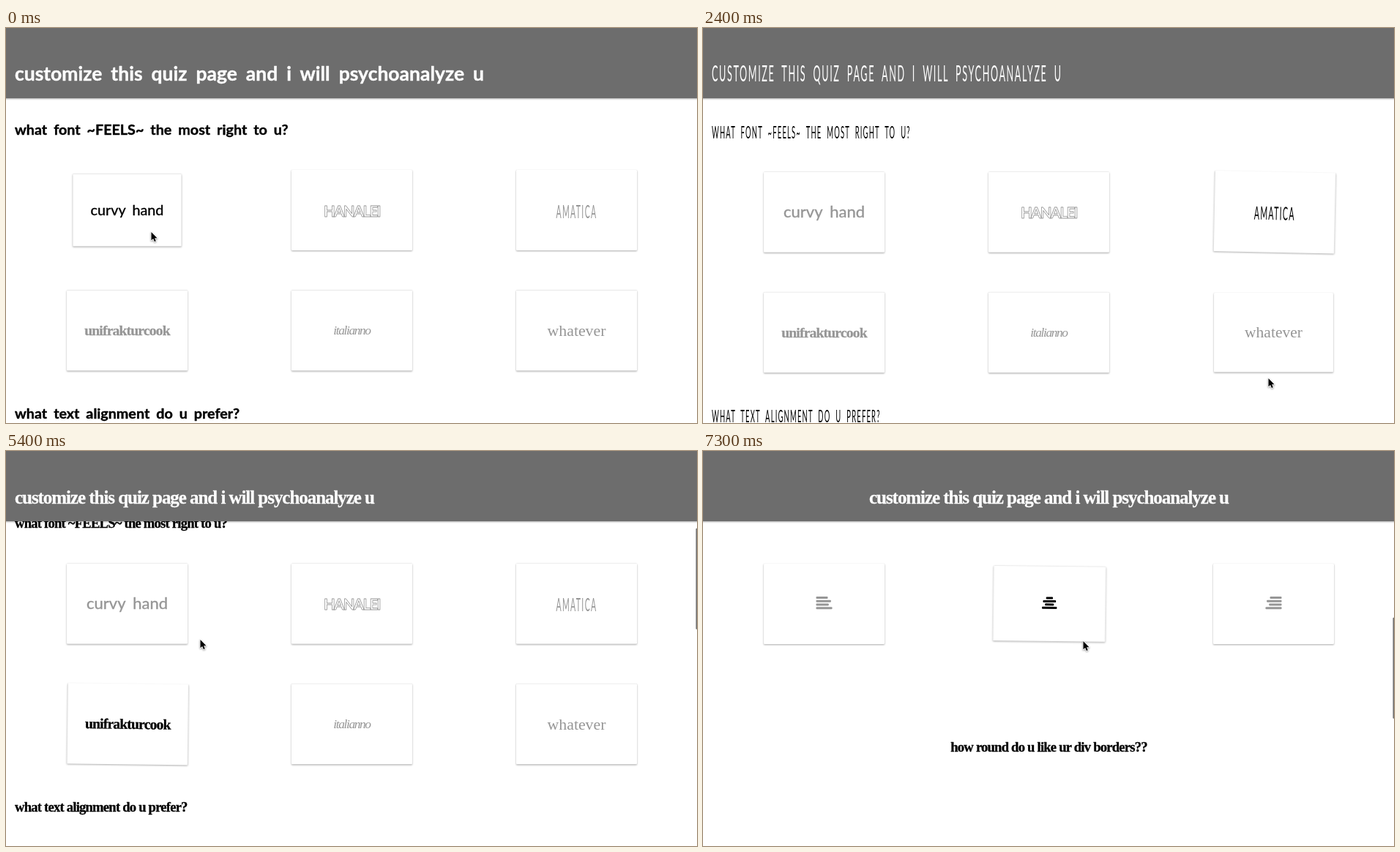
An HTML page that plays this animation: 944 by 540 pixels, repeating every 7400 ms.

```html
<!DOCTYPE html>
<html lang="en">
<head>
<meta charset="utf-8">
<title>quiz page</title>
<style>
  html, body { margin: 0; width: 100%; height: 100%; overflow: hidden; background: #fff; }
  svg { display: block; }
  text { white-space: pre; }
  .card { fill: #fff; filter: drop-shadow(0 0 .6px #0003) drop-shadow(0 1px 1px #0005); }
  .bar { fill: #6d6d6d; filter: drop-shadow(0 1px 1px #0005); }
  .cursor { stroke: #fff; stroke-width: 1.6; paint-order: stroke; stroke-linejoin: round; filter: drop-shadow(0 1px 1px #0006); }
</style>
</head>
<body>
<svg id="stage" width="944" height="540" viewBox="0 0 944 540"></svg>
<script>
const LOOP = 7400, STEP = 100, GREY = '#969696';
const MID = 472.5, COLUMN = 307, SCROLL = 441;
const SERIF = 'Liberation Serif, serif', SANS = 'Lato, sans-serif';

// size: title size, label: size on the card; spacings are in em
const faces = [
  { name: 'curvy hand', font: SANS, size: 26.5, label: 22, word: .21, stroke: .4 },
  { name: 'hanalei', font: SANS, size: 25, label: 20.5, space: -.08, caps: true, outline: true, bold: true },
  { name: 'amatica', font: SANS, size: 30, label: 25, space: .13, word: .35, caps: true, slim: .42, light: true },
  { name: 'unifrakturcook', font: SERIF, size: 25, label: 19.6, space: -.042, bold: true, stroke: .3 },
  { name: 'italianno', font: SERIF, size: 20, label: 17.4, space: -.08, italic: true },
  { name: 'whatever', font: SERIF, size: 25, label: 21.8 }
];

// Cursor stops: time, x, y and the card clicked there (0-5 faces, 6-8 alignments)
const stops = [
  [-2000, 199, 279, 0], [0, 199, 279], [600, 488, 412, 4], [1200, 533, 393],
  [1500, 505, 262, 1], [2020, 785, 262, 2], [2280, 773, 479], [2400, 773, 479],
  [2700, 790, 425, 5], [3250, 795, 420], [3650, 480, 132], [4100, 196, 234, 0],
  [4720, 182, 400, 3], [5400, 266, 258], [6600, 371, 231], [6880, 480, 215, 7], [7300, 520, 260]
];
const clicks = stops.filter(s => s.length > 3).map(s => ({ time: s[0], card: s[3] }));

const clamp = v => Math.max(0, Math.min(1, v));
const smooth = v => (v = clamp(v), v * v * (3 - 2 * v));
const scrollAt = t => SCROLL * smooth((t - 4900) / 1200) ** 2.48;

function cursorAt(t) {
  const n = Math.max(1, stops.findIndex(s => s[0] >= t));
  const [t0, x0, y0] = stops[n - 1], [t1, x1, y1] = stops[n];
  const k = smooth((t - t0) / (t1 - t0));
  return [x0 + (x1 - x0) * k, y0 + (y1 - y0) * k];
}

function stateAt(t) {
  const done = clicks.filter(c => c.time <= t);
  const face = faces[done.findLast(c => c.card < 6).card];
  return {
    last: done.at(-1), face,
    align: done.findLast(c => c.card > 5)?.card,
    row: 228.5 + .775 * face.size - scrollAt(t) // centre of the first card row
  };
}

const cardX = i => MID + (i % 3 - 1) * COLUMN;
const cardY = (i, row) => row + [0, 164.5, 402][Math.floor(i / 3)];

// Share of the last 200 ms the cursor spent on the card
function hover(i, t) {
  let sum = 0;
  for (let k = 0; k < 8; k++) {
    const then = t - k * 25, [x, y] = cursorAt(then);
    sum += Math.abs(x - cardX(i)) < 75 && Math.abs(y - cardY(i, stateAt(then).row)) < 51;
  }
  return sum / 8;
}

function write(str, face, size, x, y, color, anchor, bold) {
  const { slim = 1, space = 0, word = 0, stroke = 0 } = face;
  const paint = face.outline
    ? `fill="none" stroke="${color}" stroke-width=".8"`
    : `fill="${color}" stroke="${color}" stroke-width="${stroke}"`;
  return `<text transform="translate(${x} ${y}) scale(${slim} 1)" ${paint} stroke-linejoin="round"
    font-family="${face.font}" font-size="${size}" font-weight="${bold ? 700 : 400}"
    font-style="${face.italic ? 'italic' : 'normal'}" letter-spacing="${space * size}"
    word-spacing="${word * size}" text-anchor="${anchor}">${face.caps ? str.toUpperCase() : str}</text>`;
}

function icon(side, color) {
  const widths = side ? [16, 20.4, 17.3, 22] : [10, 19, 13, 22];
  return widths.map((w, k) =>
    `<rect x="${side * (11 - w / 2) - w / 2}" y="${k * 4.75 - 10}" width="${w}" height="3.2" rx="1" fill="${color}"/>`).join('');
}

function card(i, t, { last, face, align, row }) {
  const age = last.card === i ? t - last.time : Infinity;
  const swing = age < 1100 ? 1.8 * (1 - age / 1100) * Math.sin(age * Math.PI / 150) : 0;
  const scale = 1 - .1 * hover(i, t) * clamp((age - 100) / 400);
  const own = faces[i];
  const color = (own ? own === face : !align || align === i) ? '#000' : GREY;
  const content = own
    ? write(own.name, own, own.label, 0, own.label * (own.caps ? .42 : .33), color, 'middle', own.bold)
    : icon(i - 7, color);
  return `<g transform="translate(${cardX(i) + swing * 1.2} ${cardY(i, row)}) rotate(${swing}) scale(${scale})">
    <rect class="card" x="-82.5" y="-55" width="165" height="110" rx="1"/>${content}</g>`;
}

function draw(t) {
  const state = stateAt(t), { face, row, align } = state;
  const [anchor, x] = align ? ['middle', MID] : ['start', 12];
  const line = (str, size, y, color) => write(str, face, size, x, y, color, anchor, !face.light);
  const heading = (str, y) => line(str, face.size * .745, row + y + (face.size - 26.5) / 2, '#000');
  const [cx, cy] = cursorAt(t);
  let out = heading('what font ~FEELS~ the most right to u?', -103)
    + heading('what text alignment do u prefer?', 285)
    + heading('how round do u like ur div borders??', 605);
  for (let i = 0; i < 9; i++) out += card(i, t, state);
  out += '<rect class="bar" x="-5" y="-5" width="954" height="101"/>'
    + line('customize this quiz page and i will psychoanalyze u', face.size, 62 + face.size * .38, '#fff');
  if (t >= 4900) out += `<rect x="942.5" y="${94 + scrollAt(t) * .3035}" width="4" height="138" rx="1" fill="#6d6d6d"/>`;
  out += `<path class="cursor" transform="translate(${cx - .5} ${cy})" d="M0 0V11.3L2.6 9 4.4 13 6.3 12.2 4.6 8.2H8Z"/>`;
  stage.innerHTML = out;
}

const stage = document.getElementById('stage');
const start = performance.now();
let shown = -1;
function tick() {
  const t = Math.floor((performance.now() - start) % LOOP / STEP) * STEP;
  if (t !== shown) draw(shown = t);
  requestAnimationFrame(tick);
}
tick();
</script>
</body>
</html>
```
